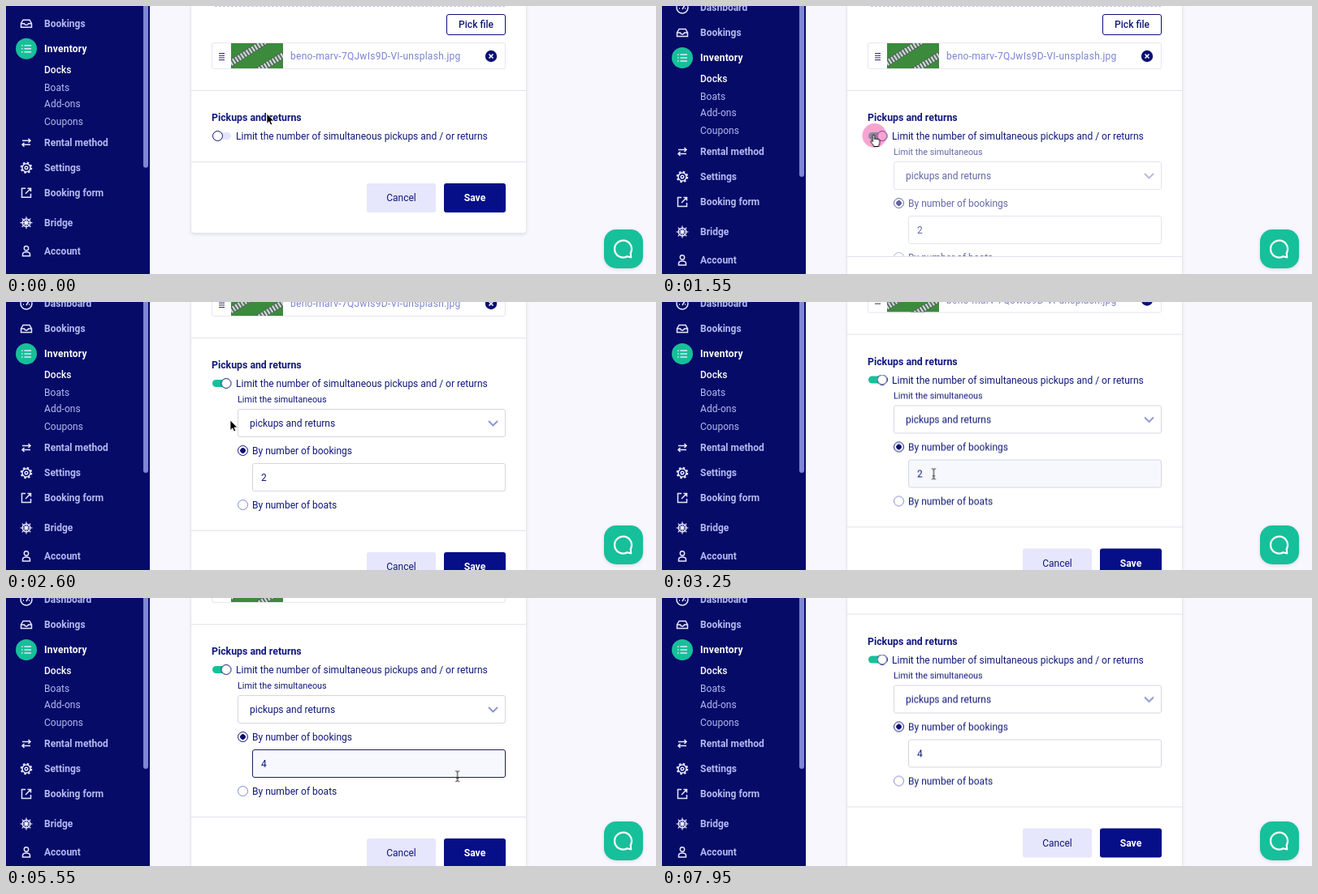
Animation, 800 px wide and 331 px high, one loop 8000 ms. Source, as an HTML page:

```html
<!DOCTYPE html>
<html lang="en">
<head>
<meta charset="utf-8">
<title>Limit pickups and returns</title>
<style>
html, body { margin: 0; width: 100%; height: 100%; overflow: hidden; }
body { position: relative; background: #f7f7fd; color: #11187a; font: 400 12px/16px Roboto, "Open Sans", sans-serif; }
div, span, svg { position: absolute; box-sizing: border-box; }
span { white-space: nowrap; }
svg { overflow: visible; }
.stage { left: 0; top: 0; width: 800px; height: 331px; overflow: hidden; }
.stage, .stage * { animation: 8s linear infinite; }

/* sidebar */
.side { left: 0; top: 0; width: 177px; height: 331px; background: #060b68; overflow: hidden; }
.menu { left: 0; top: 0; width: 177px; height: 331px; animation-name: menu; }
.menu span { left: 47px; color: #b3baee; font-weight: 600; }
.menu .sub { font-weight: 400; letter-spacing: .05px; }
.menu .on { color: #fff; font-weight: 700; letter-spacing: .25px; }
.menu .cur { color: #fff; font-weight: 500; }
.thumb { left: 169px; top: -20px; width: 6px; height: 231px; border-radius: 3px; background: #7f88d2; }
.menu svg { left: 0; top: 0; fill: none; stroke: #e6e8fc; stroke-width: 1.5; }

/* page */
.page { left: 0; top: 0; width: 800px; height: 331px; animation-name: scroll; }
.card { left: 228px; top: -20px; width: 412px; background: #fff; border-radius: 4px; box-shadow: 0 0 0 1px #e5e5f0, 0 2px 4px #1414501f; }
.top, .panel, .foot { position: relative; }
.top { height: 187px; }
.panel { height: 175px; overflow: hidden; animation-name: expand; }
.fields { left: -228px; top: -167px; width: 800px; height: 360px; animation-name: appear; }
.foot { height: 88px; border-top: 1px solid #e2e3ec; }
.rule { left: 228px; top: 104px; width: 412px; height: 1px; background: #e2e3ec; }
.drop { left: 257px; top: 0; width: 357px; border-top: 1px dashed #c0c5ea; }
.box { border: 1px solid #d5d6e4; border-radius: 3px; background: #fff; }
.btn { height: 36px; border-radius: 3px; line-height: 36px; text-align: center; }
.pick { left: 542px; top: 10px; width: 73px; height: 26px; line-height: 24px; border: 1px solid #0a1172; font-weight: 500; }
.cancel { left: 216px; top: 26px; width: 85px; background: #e6e6fc; }
.save { left: 311px; top: 26px; width: 76px; background: #060f88; color: #fff; font-weight: 700; font-size: 12.2px; animation-name: save; }
.file { left: 253px; top: 45px; width: 362px; height: 33px; border-color: #e6e6f0; }
.name { left: 350px; top: 54px; color: #7b83d2; letter-spacing: .27px; }
.head { left: 253px; top: 130px; font-weight: 700; font-size: 12.3px; }
.track { left: 254px; top: 156px; width: 23px; height: 9px; border-radius: 5px; background: #18c09a; animation-name: track; }
.knob { left: 254px; top: 154px; width: 13px; height: 13px; border-radius: 50%; border: 1.3px solid #0a1172; background: #fff; animation-name: knob; }
.radio { left: 285px; width: 13px; height: 13px; border-radius: 50%; border: 1.2px solid #8087c8; background: #fff; }
.picked { border-color: #0a1172; background: radial-gradient(circle, #0a1172 3px, #fff 3.6px); }
.select { left: 285px; top: 192px; width: 330px; height: 35px; }
.input { left: 303px; top: 259px; width: 312px; height: 35px; animation-name: focus, hover; }
.mark { left: 313px; top: 269px; width: 8px; height: 16px; background: #a8cdf8; animation-name: mark; }
.num { left: 314px; top: 269px; }
.two { animation-name: two; }
.four { animation-name: four; }

.chat { left: 735.5px; top: 275.5px; width: 48px; height: 48px; border-radius: 15px; background: #16c09b; box-shadow: 0 1px 4px #0002; }

/* pointer */
.mouse { left: 0; top: 0; width: 0; height: 0; animation-name: move, shown; }
.ring { left: -14px; top: -14px; width: 30px; height: 30px; border-radius: 50%; background: #ee5aaa; animation-name: ring; }
.mouse svg { left: 0; top: 0; width: 1px; height: 1px; }
.arrow { animation-name: arrow; }
.hand { animation-name: hand; }
.beam { animation-name: beam; }
.mouse .arrow, .mouse .hand, .mouse .beam,
.mark, .two, .four { animation-timing-function: step-end; }

@keyframes menu {
  0%, 17.5% { transform: translateY(-11.3px); }
  18.2%, 100% { transform: none; }
}
@keyframes scroll {
  0%, 23.75% { transform: none; animation-timing-function: cubic-bezier(.3, .3, .6, .9); }
  32.5% { transform: translateY(-60px); animation-timing-function: ease-out; }
  35%, 65% { transform: translateY(-64.5px); animation-timing-function: ease-in; }
  69.375% { transform: translateY(-72px); animation-timing-function: ease-out; }
  75%, 100% { transform: translateY(-84.5px); }
}
@keyframes expand {
  0%, 17.5% { height: 25px; animation-timing-function: cubic-bezier(.4, 0, .2, 1); }
  21.25%, 100% { height: 175px; }
}
@keyframes appear {
  0%, 17.5% { opacity: 0; }
  19.375% { opacity: .65; }
  21.25%, 100% { opacity: 1; }
}
@keyframes track {
  0%, 17.5% { background: #e4e4fb; }
  19.375%, 100% { background: #18c09a; }
}
@keyframes knob {
  0%, 17.5% { transform: none; }
  18.9%, 100% { transform: translateX(10.5px); }
}
@keyframes focus {
  0%, 43% { border-color: #d5d6e4; }
  43.2%, 83.4% { border-color: #1c2258; }
  84.5%, 100% { border-color: #d5d6e4; }
}
@keyframes hover {
  0%, 38% { background: #fff; }
  38.6%, 48.7% { background: #f7f8fd; }
  49.4%, 66% { background: #fff; }
  66.6%, 70% { background: #f7f8fd; }
  71%, 100% { background: #fff; }
}
@keyframes mark {
  0% { opacity: 0; }
  46.25% { opacity: 1; }
  59.375%, 100% { opacity: 0; }
}
@keyframes two {
  0% { opacity: 1; }
  59.375%, 100% { opacity: 0; }
}
@keyframes four {
  0% { opacity: 0; }
  59.375%, 100% { opacity: 1; }
}
@keyframes save {
  0%, 74.375% { background: #060f88; }
  75.6%, 97% { background: #1f2db6; }
  98.75%, 100% { background: #060f88; }
}
@keyframes move {
  0% { transform: translate(321px, 133px); animation-timing-function: ease-in-out; }
  12.5%, 21.875% { transform: translate(260.5px, 159px); animation-timing-function: ease-in-out; }
  32.5% { transform: translate(276px, 146px); animation-timing-function: ease-in-out; }
  41.25%, 43.125% { transform: translate(335px, 213px); animation-timing-function: ease-in-out; }
  51.25%, 65% { transform: translate(286.5px, 211px); animation-timing-function: ease-in-out; }
  69.375% { transform: translate(555.5px, 220px); animation-timing-function: ease-out; }
  78.125%, 100% { transform: translate(588.5px, 298px); }
}
@keyframes shown {
  0%, 59.3% { opacity: 1; }
  59.4%, 64.9% { opacity: 0; }
  65%, 97% { opacity: 1; }
  98.75%, 100% { opacity: 0; }
}
@keyframes ring {
  0%, 17.4% { opacity: 0; transform: scale(.6); }
  18.2%, 20% { opacity: .55; transform: none; }
  22%, 83.2% { opacity: 0; transform: none; }
  84%, 85.6% { opacity: .55; transform: none; }
  87.5%, 100% { opacity: 0; transform: none; }
}
@keyframes arrow {
  0% { opacity: 1; }
  8% { opacity: 0; }
  25% { opacity: 1; }
  38.1% { opacity: 0; }
  49% { opacity: 1; }
  66.2% { opacity: 0; }
  70% { opacity: 1; }
  74.375%, 100% { opacity: 0; }
}
@keyframes hand {
  0% { opacity: 0; }
  8% { opacity: 1; }
  25% { opacity: 0; }
  74.375%, 100% { opacity: 1; }
}
@keyframes beam {
  0% { opacity: 0; }
  38.1% { opacity: 1; }
  49% { opacity: 0; }
  66.2% { opacity: 1; }
  70%, 100% { opacity: 0; }
}
</style>
</head>
<body>
<div class="stage">
  <div class="page">
    <div class="card">
      <div class="top"></div>
      <div class="panel">
        <div class="fields">
          <span style="left:285px;top:173px;font-size:10.8px">Limit the simultaneous</span>
          <div class="box select"></div>
          <span style="left:300px;top:202px">pickups and returns</span>
          <svg style="left:593px;top:206px" width="13" height="8" fill="none" stroke="#8b92d2" stroke-width="1.8"><path d="M1 1 6.5 6.5 12 1"/></svg>
          <div class="radio picked" style="top:237px"></div>
          <span style="left:303px;top:236px">By number of bookings</span>
          <div class="box input"></div>
          <div class="mark"></div>
          <span class="num two">2</span>
          <span class="num four">4</span>
          <div class="radio" style="top:304px"></div>
          <span style="left:303px;top:303px">By number of boats</span>
        </div>
      </div>
      <div class="foot">
        <div class="btn cancel">Cancel</div>
        <div class="btn save">Save</div>
      </div>
    </div>
    <div class="drop"></div>
    <div class="btn pick">Pick file</div>
    <div class="box file"></div>
    <svg style="left:262px;top:58px" width="7" height="9" stroke="#24285f"><path d="M0 .5H7M0 3.2H7M0 5.9H7M0 8.6H7"/></svg>
    <svg style="left:277px;top:46px;overflow:hidden" width="64" height="31" fill="none">
      <path fill="#3c8a3c" d="M0 0H64V31H0Z"/>
      <g stroke="#4f6a5a" stroke-width="9"><path d="M-4 27 46-5M28 37 70 11"/></g>
      <g stroke="#cdd5d2" stroke-width="7" stroke-dasharray="2.2 1.8"><path d="M-4 27 46-5M28 37 70 11"/></g>
    </svg>
    <span class="name">beno-marv-7QJwIs9D-VI-unsplash.jpg</span>
    <svg style="left:597px;top:62px" width="1" height="1" stroke="#fff" stroke-width="1.6"><circle r="7.2" fill="#0a1172" stroke="none"/><path d="M-2.5-2.5 2.5 2.5M2.5-2.5-2.5 2.5"/></svg>
    <div class="rule"></div>
    <span class="head">Pickups and returns</span>
    <div class="track"></div>
    <div class="knob"></div>
    <span style="left:283px;top:153px">Limit the number of simultaneous pickups and / or returns</span>
  </div>

  <div class="side">
    <div class="menu">
      <div class="thumb"></div>
      <svg width="177" height="331">
        <g transform="translate(25 2)"><circle r="7"/><path d="M0 2 3-3M-4 1H-3M3 1H4"/></g>
        <g transform="translate(25 33)"><path d="M-6.5 0-4-4.5H4L6.5 0V4.5H-6.5ZM-6.5 0H-2.5C-2 2.5 2 2.5 2.5 0H6.5"/></g>
        <g transform="translate(25 64)"><circle r="13" fill="#16c098" stroke="none"/><path d="M-2.5-4H6M-2.5 0H6M-2.5 4H6M-6-4H-4.5M-6 0H-4.5M-6 4H-4.5"/></g>
        <g transform="translate(25 180)"><path d="M-5-2.5H5M2.5-5 5-2.5 2.5 0M5 2.5H-5M-2.5 0-5 2.5-2.5 5"/></g>
        <g transform="translate(25 211)"><circle r="5"/><circle r="1.8"/><circle r="6.2" stroke-width="2.2" stroke-dasharray="2.43 2.44"/></g>
        <g transform="translate(25 242)"><path d="M-1-5.5H-5.5V5.5H5.5V1M1.5-5.5H5.5V-1.5M5.5-5.5-1 1"/></g>
        <g transform="translate(25 279)"><circle r="4.8"/><circle r="1.5"/><path stroke-width="1.2" d="M0-7.5V7.5M-7.5 0H7.5M-5.3-5.3 5.3 5.3M5.3-5.3-5.3 5.3"/></g>
        <g transform="translate(25 314)"><circle cy="-3.5" r="2.7"/><path d="M-4.5 6V4C-4.5 0 4.5 0 4.5 4V6Z"/></g>
      </svg>
      <span style="top:-6px">Dashboard</span>
      <span style="top:25px">Bookings</span>
      <span class="on" style="top:56px">Inventory</span>
      <span class="cur" style="top:82px">Docks</span>
      <span class="sub" style="top:104px">Boats</span>
      <span class="sub" style="top:124px">Add-ons</span>
      <span class="sub" style="top:146px">Coupons</span>
      <span style="top:172px">Rental method</span>
      <span style="top:203px">Settings</span>
      <span style="top:234px">Booking form</span>
      <span style="top:271px">Bridge</span>
      <span style="top:306px">Account</span>
    </div>
  </div>

  <div class="chat">
    <svg width="48" height="48" fill="none" stroke="#fff" stroke-width="2.2" stroke-linejoin="round"><path d="M33.2 34.5 28.7 33.2A10.5 10.5 0 1 1 32.8 29Z"/></svg>
  </div>

  <div class="mouse">
    <div class="ring"></div>
    <svg class="arrow" fill="#000" stroke="#fff" stroke-width=".8"><path d="M0 0V12.5L2.8 9.8 4.7 14 6.8 13.1 4.9 9H8.8Z"/></svg>
    <svg class="hand" fill="#fff" stroke="#000" stroke-linejoin="round"><path d="M-1.2 1.2a1.2 1.2 0 0 1 2.4 0v4.3c.3-.9 2-.8 2.2.2.5-.8 2-.6 2.1.4.6-.6 1.9-.3 1.9.8v2.6c0 2.2-1.2 3-1.2 5h-6c-.3-2-2.4-3.2-3.6-5.6-.6-1.2.8-1.9 1.6-1.2l.6.8z"/></svg>
    <svg class="beam" fill="none" stroke="#222"><path d="M-2.5-6.5Q0-6.5 0-5V5Q0 6.5-2.5 6.5M2.5-6.5Q0-6.5 0-5M0 5Q0 6.5 2.5 6.5M-1.5 2.5H1.5"/></svg>
  </div>
</div>
</body>
</html>
```
